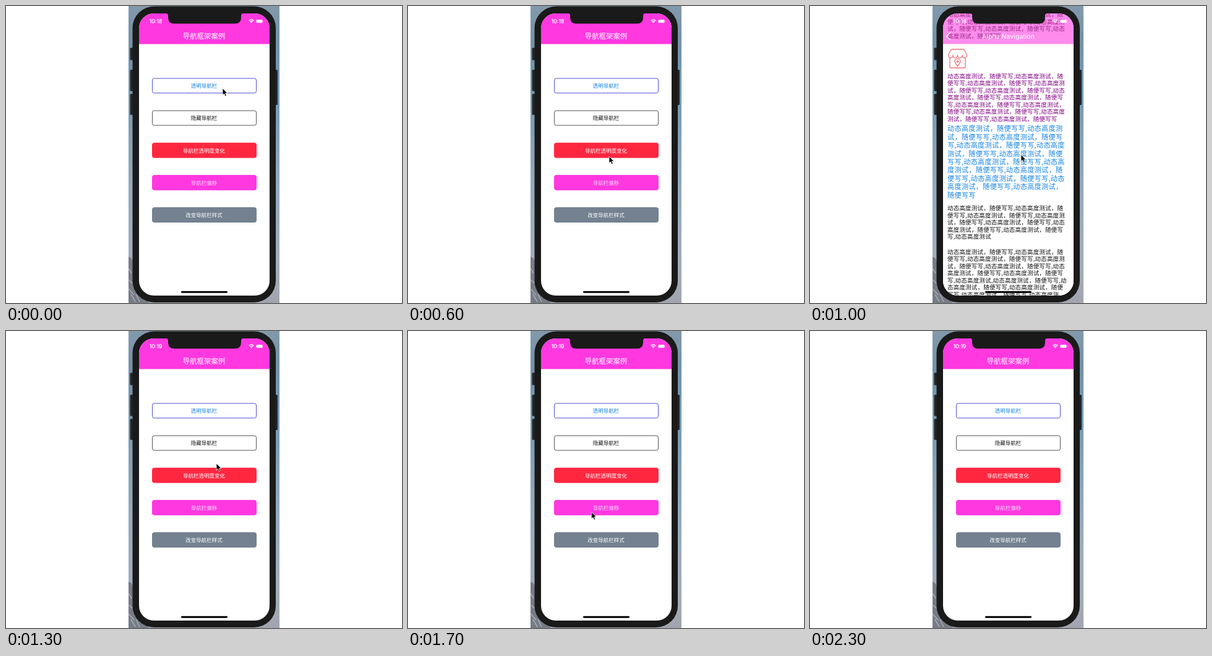
Recreate the animation shown at these times as an HTML page. Size 640 by 480 pixels, loop 2400 ms.

```html
<!DOCTYPE html>
<html lang="zh-CN">
<head>
<meta charset="utf-8">
<title>导航框架案例</title>
<style>
  html, body { margin: 0; width: 100%; height: 100%; overflow: hidden; background: #fff; }
  body {
    --pink: #ff38e0; --slate: #738190;
    font-family: "Noto Sans CJK SC", "Noto Sans CJK", sans-serif;
    text-spacing-trim: space-all;
  }
  .stage { position: relative; width: 640px; height: 480px; overflow: hidden; }
  svg { position: absolute; left: 0; top: 0; width: 640px; height: 480px; }
  text { text-anchor: middle; }

  .screen {
    position: absolute; left: 215px; top: 12px; width: 210.5px; height: 456px;
    border-radius: 24px; overflow: hidden; background: #fff;
  }
  /* shifts children so that they share stage coordinates */
  .origin { position: absolute; left: -215px; top: -12px; width: 640px; height: 480px; }
  .page { position: absolute; inset: 0; background: #fff; visibility: hidden; }

  .title { font-size: 11.4px; font-weight: 300; fill: #fff; }
  .btn { font-size: 8.5px; }
  .latin { font-family: Inter, Roboto, sans-serif; }
  .back { fill: none; stroke: #fff; stroke-width: 1.6; stroke-linecap: round; stroke-linejoin: round; }

  p {
    position: absolute; left: 222px; width: 196px; margin: 0;
    font-size: 9.5px; line-height: 11.5px; letter-spacing: .2px; color: #111;
  }
  p.purple { color: #800080; }
  p.blue { color: #1583e4; font-size: 11.2px; line-height: 13.42px; letter-spacing: .25px; }

  /* the small lead keeps every switch on its 100 ms mark */
  .page, .list, .bar, .tone, .early, .late, .cursor {
    animation: 2400ms step-end -10ms infinite;
  }
  .clear { animation-name: clear; }
  .alpha { animation-name: alpha; }
  .style { animation-name: style; }
  .list { animation-name: scroll; }
  .bar { animation-name: fade; }
  .tone { animation-name: tone; }
  .early { animation-name: early; }
  .late { animation-name: late; }
  .cursor { animation-name: point; }

  @keyframes clear { 0%, 16.6667% { visibility: hidden } 4.1667% { visibility: visible } }
  @keyframes alpha { 0%, 50% { visibility: hidden } 29.1667% { visibility: visible } }
  @keyframes style { 0%, 95.8333% { visibility: hidden } 79.1667% { visibility: visible } }
  @keyframes tone { 0%, 95.8333% { color: #fff } 79.1667% { color: #111 } }
  @keyframes early { 0% { visibility: visible } 50%, 100% { visibility: hidden } }
  @keyframes late { 0% { visibility: hidden } 50%, 100% { visibility: visible } }
  @keyframes scroll {
    0% { transform: translateY(99.5px) }
    29.1667% { transform: translateY(99.5px); animation-timing-function: steps(5) }
    50%, 100% { transform: translateY(-66.33px) }
  }
  @keyframes fade {
    0% { opacity: 0 }
    29.1667% { opacity: 0; animation-timing-function: steps(5) }
    50%, 100% { opacity: .967 }
  }
  @keyframes point {
    0% { transform: translate(350px, 133px); animation-timing-function: steps(2) }
    8.3333% { transform: translate(341px, 326px); animation-timing-function: steps(4) }
    25% { transform: translate(325px, 243px) }
    29.1667% { transform: translate(341px, 339.6px); animation-timing-function: steps(5) }
    50% { transform: translate(341px, 174px); animation-timing-function: steps(3) }
    62.5% { transform: translate(338px, 294px); animation-timing-function: steps(4) }
    79.1667% { transform: translate(255px, 291px); animation-timing-function: steps(4) }
    95.8333%, 100% { transform: translate(-40px, 0) }
  }
</style>
</head>
<body>
<div class="stage">
  <!-- wallpaper and handset -->
  <svg viewBox="0 0 640 480">
    <defs>
      <linearGradient id="sky" x2="0" y2="1">
        <stop offset="0" stop-color="#8299ab"/>
        <stop offset=".12" stop-color="#7492a8"/>
        <stop offset=".3" stop-color="#7599b2"/>
        <stop offset=".6" stop-color="#93a9bd"/>
        <stop offset=".85" stop-color="#a3adbb"/>
        <stop offset="1" stop-color="#a2a5b0"/>
      </linearGradient>
      <symbol id="chevron" viewBox="0 0 8 13" width="8" height="13">
        <path d="M6.6 1.2 1.2 6.5l5.4 5.3"/>
      </symbol>
      <symbol id="shop" viewBox="0 0 34 34" width="34" height="34">
        <g fill="none" stroke="#ee7078" stroke-width="1.3" stroke-linejoin="round" stroke-linecap="round">
          <path d="M2 11.500 5.500 4q1-2 3-2h17q2 0 3 2l3.500 7.500a3.750 4.400 0 0 1-7.500 0a3.750 4.400 0 0 1-7.500 0a3.750 4.400 0 0 1-7.500 0a3.750 4.400 0 0 1-7.500 0z"/>
          <path d="M4.500 16v14q0 2 2 2h21q2 0 2-2V16M17 29c-2.800-3.400-4.500-5.300-4.500-7.300a4.500 4.500 0 0 1 9 0c0 2-1.700 3.900-4.500 7.300z"/>
          <circle cx="17" cy="21.800" r="1.300"/>
        </g>
      </symbol>
    </defs>
    <path fill="url(#sky)" d="M198 0h244v480H198z"/>
    <path fill="#767c87" d="M198 405l5 3 4 12 8 26 16 34h-33z"/>
    <path fill="none" stroke="#a9adb5" stroke-width="1.5" d="M198 424l5 8M199 443l5 5M198 457l9 10M202 466l7 12M210 466l6 12"/>
    <g fill="#20262b">
      <rect x="200.500" y="67.500" width="6" height="20" rx="1.500"/>
      <rect x="200.500" y="103" width="6" height="34.500" rx="1.500"/>
      <rect x="200.500" y="142" width="6" height="34" rx="1.500"/>
      <rect x="433" y="103" width="6" height="57" rx="1.500"/>
    </g>
    <rect x="204.500" y=".5" width="231.500" height="478.500" rx="35" fill="#1a1a1a"/>
  </svg>

  <div class="screen"><div class="origin">
    <svg viewBox="0 0 640 480">
      <path fill="var(--pink)" d="M215 12h211v49.500H215z"/>
      <text class="title" x="320" y="53">导航框架案例</text>
      <g id="menu" class="btn"></g>
    </svg>

    <div class="page clear">
      <svg viewBox="0 0 640 480">
        <path fill="var(--pink)" d="M215 12h211v205.500H215z"/>
        <use href="#chevron" class="back" x="219.500" y="42.500"/>
        <text class="title" x="320" y="53">透明导航栏</text>
        <text x="320" y="104.600" font-size="9.500" font-weight="300" fill="#fff">下拉看看</text>
      </svg>
    </div>

    <div class="page alpha">
      <div class="list" id="list">
        <svg viewBox="0 0 640 480" style="overflow:visible">
          <use href="#shop" x="221.500" y="-31.500"/>
          <use href="#shop" x="221.500" y="68"/>
        </svg>
      </div>
      <svg viewBox="0 0 640 480">
        <path class="bar" fill="var(--pink)" d="M215 12h211v49.500H215z"/>
        <use href="#chevron" class="back" x="219.500" y="42.500"/>
        <text class="latin" x="320.500" y="53" font-size="10.600" fill="#fff">Alpha Navigation</text>
      </svg>
    </div>

    <div class="page style">
      <svg viewBox="0 0 640 480">
        <path fill="var(--slate)" d="M215 12h211v49.500H215z"/>
        <use href="#chevron" class="back" x="219.500" y="42.500" style="stroke:#e23bd6;stroke-width:2"/>
        <text class="title" x="320" y="53" style="fill:#f47f1c;font-weight:500">改变导航栏样式</text>
        <path stroke="#59636e" stroke-dasharray="1.500 1.500" d="M380 26.500h10"/>
        <rect x="231" y="288.500" width="178.500" height="27" rx="3" fill="#fff" stroke="#aab3bc"/>
        <text x="320.300" y="305.500" font-size="10.270" fill="#708090">点我返回,看看上一个样式没有改变</text>
      </svg>
    </div>
  </div></div>

  <!-- notch, status bar, home indicator, pointer -->
  <svg viewBox="0 0 640 480">
    <path fill="#1a1a1a" d="M258 11.500h126q-4 .5-4 4v3q0 10-10 10h-98q-10 0-10-10v-3q0-3.500-4-4z"/>
    <g class="tone" fill="currentColor">
      <g class="latin" font-size="8.300" font-weight="600">
        <text class="early" x="242" y="27.500">10:18</text>
        <text class="late" x="242" y="27.500">10:19</text>
      </g>
      <path d="M396.500 27.800l-1.500-1.700q1.500-1.200 3 0z"/>
      <path fill="none" stroke="currentColor" stroke-width="1.200" d="M392.500 23.700q4-3.500 8 0M394 25.300q2.500-2 5 0"/>
      <rect x="404.500" y="22.300" width="10" height="4.900" rx="1.300"/>
      <path d="M415 23.700q1.300 1 0 2.100z"/>
    </g>
    <rect x="283" y="460.800" width="75" height="2.900" rx="1.450"/>
    <path class="cursor" stroke="#fff" stroke-width=".8" stroke-linejoin="round"
      d="M0 0v11l2.500-2.300 1.800 4 2-.9L4.600 7.900H8z"/>
  </svg>
</div>

<script>
  // label, fill, border, text colour
  const buttons = [
    ["透明导航栏", "#fff", "#5050d8", "#1583e4"],
    ["隐藏导航栏", "#fff", "#555", "#111"],
    ["导航栏透明度变化", "#ff2740", "#ff2740", "#fff"],
    ["导航栏偏移", "#ff38e0", "#ff38e0", "#ffd5f8"],
    ["改变导航栏样式", "#738190", "#738190", "#fff"]
  ];
  document.getElementById("menu").innerHTML = buttons.map(([label, fill, line, ink], i) => {
    const y = 117 + i * 52.2;
    return `<rect x="236.5" y="${y}" width="168" height="23.7" rx="3" fill="${fill}" stroke="${line}"/>
      <text x="320" y="${y + 15.1}" fill="${ink}">${label}</text>`;
  }).join("");

  const head = "动态高度测试";
  const phrase = head + "，随便写写";
  const say = n => Array(n).fill(phrase).join(",");
  const mixed = say(7) + "," + head;

  // top, colour class, text
  const paragraphs = [
    [8.2, "", say(6)],
    [107.8, "purple", say(12)],
    [191.3, "blue", say(12)],
    [321.2, "", mixed],
    [391.8, "", mixed + "," + mixed + "," + mixed]
  ];
  const list = document.getElementById("list");
  for (const [top, tint, text] of paragraphs) {
    const p = document.createElement("p");
    p.className = tint;
    p.style.top = top + "px";
    p.textContent = text;
    list.append(p);
  }
</script>
</body>
</html>
```
